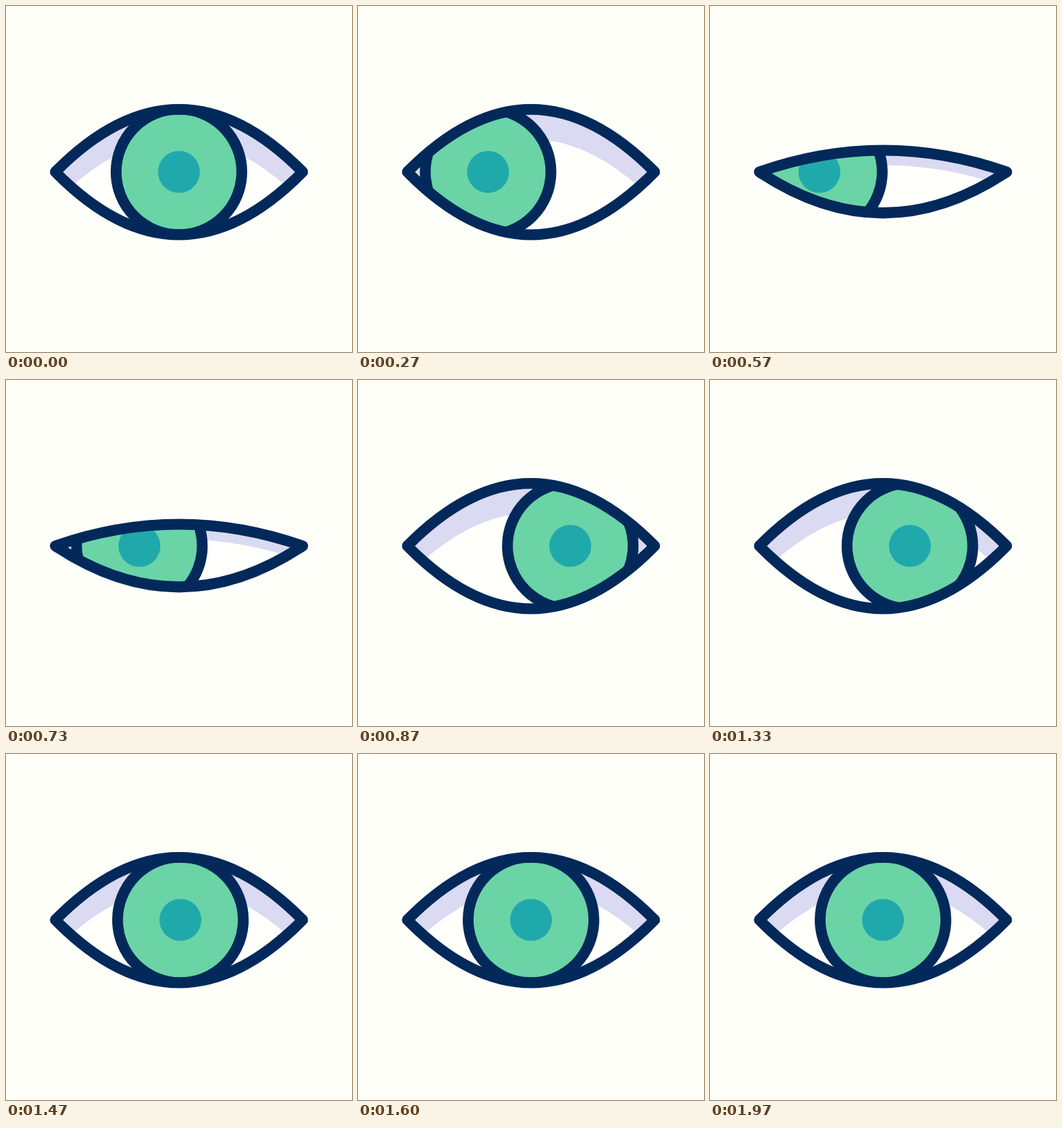
An HTML page for the animation above (2.01 s loop, 512 by 512 pixels).

```html
<!DOCTYPE html>
<html lang="en">
<head>
<meta charset="utf-8">
<title>Looking eye</title>
<style>
  html, body { margin: 0; width: 100%; height: 100%; overflow: hidden; background: #fffffa; }
  svg { display: block; width: 100vw; height: 100vh; }
  .line { fill: none; stroke: #03295b; stroke-width: 16; stroke-linejoin: round; }
</style>
</head>
<body>
<svg viewBox="0 0 512 512">
  <defs>
    <clipPath id="opening"><path class="lids"/></clipPath>
  </defs>
  <g clip-path="url(#opening)">
    <rect width="512" height="512" fill="#fffffc"/>
    <path id="shade" fill="#dadaf2"/>
    <g id="iris">
      <circle class="line" r="93" style="fill:#6ad4a6"/>
      <circle r="31" fill="#20a9ab"/>
    </g>
  </g>
  <path class="lids line"/>
</svg>
<script>
  const LOOP = 2010, FRAMES = 60;
  const LEFT = 73, RIGHT = 439, MID = 256, AXIS = 245.5;
  const TOP = 153, BOTTOM = 338.5, SHUT = 274, SHADE = 44;

  // Gaze keys: [frame, iris centre]
  const gaze = [[-1, 256], [15, 160.5], [31, 335.5], [47, 256], [59, 256], [75, 160.5]];
  const blinks = [15, 47];
  const HALF_BLINK = 4;

  const lids = document.querySelectorAll('.lids');
  const shade = document.getElementById('shade');
  const iris = document.getElementById('iris');

  const mix = (a, b, k) => a + (b - a) * k;
  const ease = p => p < 0.5 ? 4 * p ** 3 : 1 - 4 * (1 - p) ** 3;

  function irisX(frame) {
    const i = gaze.findIndex(key => key[0] > frame);
    const [t0, x0] = gaze[i - 1], [t1, x1] = gaze[i];
    return mix(x0, x1, ease((frame - t0) / (t1 - t0)));
  }

  function closure(frame) {
    const reach = blinks.map(start => 1 - Math.abs(frame - start - HALF_BLINK) / HALF_BLINK);
    return ease(Math.max(0, ...reach));
  }

  // Arc between the eye corners whose middle passes through y = peak
  const arc = (peak, x, end = AXIS) => `Q${MID} ${2 * peak - end} ${x} ${end}`;

  function draw(now) {
    // Pose is held for each step of the frame rate
    const frame = Math.floor((now % LOOP) / LOOP * FRAMES + 0.15) % FRAMES;
    const shut = closure(frame);
    const top = mix(TOP, SHUT, shut);
    const bottom = mix(BOTTOM, SHUT, shut);
    const drop = SHADE * (1 - shut);

    const outline = `M${LEFT} ${AXIS}${arc(top, RIGHT)}${arc(bottom, LEFT)}Z`;
    lids.forEach(path => path.setAttribute('d', outline));
    shade.setAttribute('d',
      `M${LEFT} ${AXIS}${arc(top, RIGHT)}V${AXIS + drop}${arc(top + drop, LEFT, AXIS + drop)}Z`);
    iris.setAttribute('transform', `translate(${irisX(frame)} ${AXIS})`);
  }

  const origin = performance.now();
  function tick() {
    draw(performance.now() - origin);
    requestAnimationFrame(tick);
  }
  tick();
</script>
</body>
</html>
```
